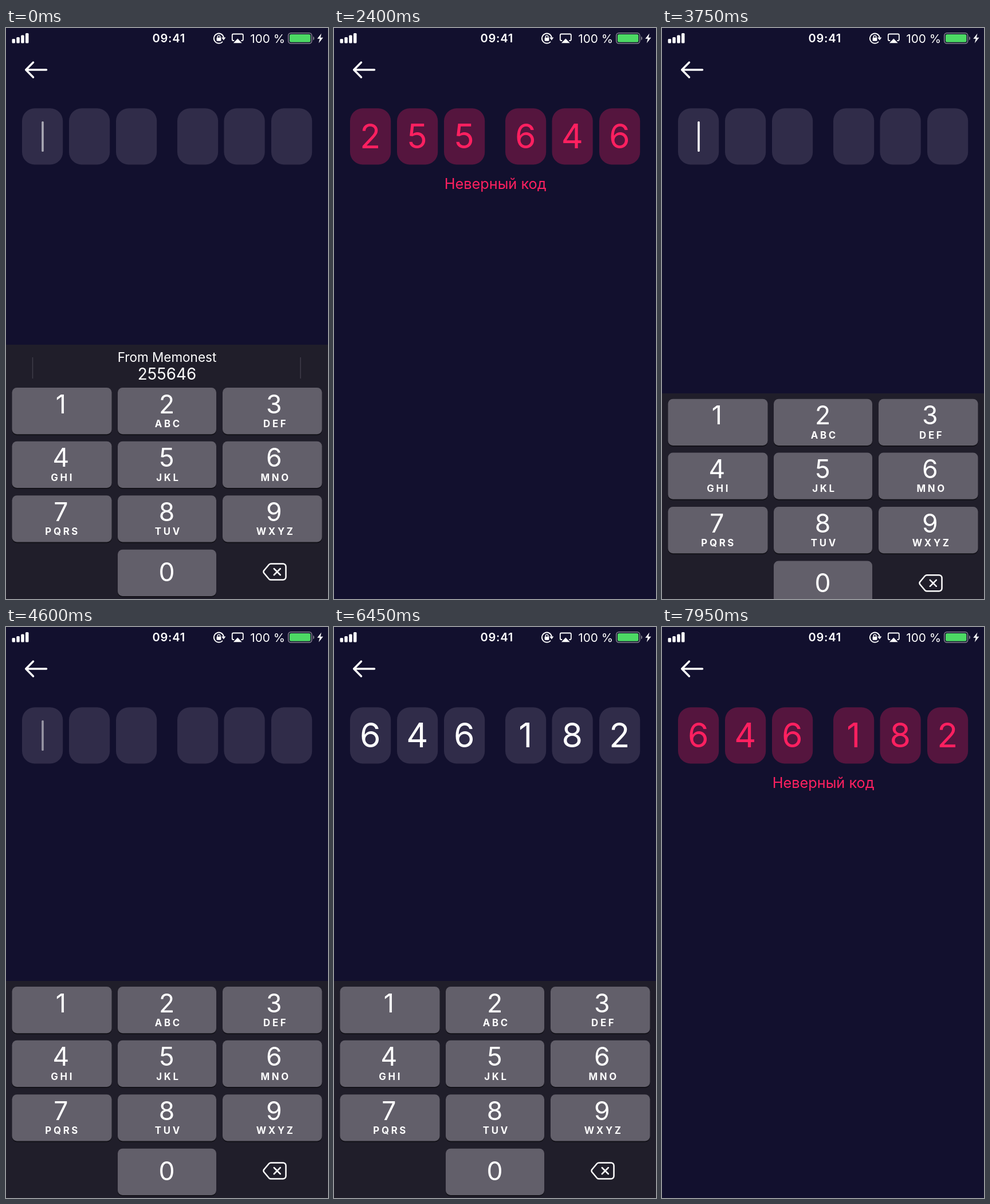
An HTML page that plays this animation: 562x997 px, repeating every 8 s.

```html
<!DOCTYPE html>
<html lang="ru">
<head>
<meta charset="utf-8">
<title>Code entry</title>
<style>
html, body { margin: 0; width: 100%; height: 100%; overflow: hidden; background: #12102e; }
svg { display: block; width: 562px; height: 997px; font-family: Inter, Roboto, sans-serif; }
text { text-anchor: middle; }
.line { fill: none; stroke: #fff; stroke-linecap: round; stroke-linejoin: round; }

#cells { fill: #302c49; animation: cells 8s infinite; }
.digits { fill: #fff; font-size: 59px; }
#first { animation: ink 8s infinite, first 8s linear infinite; }
#second { animation: ink 8s infinite; }
#second text { animation: 8s step-end infinite; }
#label { fill: #ff2060; font-size: 25.3px; animation: label 8s infinite, labelInk 8s infinite; }
#cursor { fill: #fff; animation: move 8s step-end infinite, blink 8s linear infinite; }
#spinner { animation: spinner 8s linear infinite; }
#spokes { stroke: #fff; stroke-width: 5.4; stroke-linecap: round; transform-origin: 279px 616px; animation: spin 1s steps(12) infinite; }
#keyboard { animation: keyboard 8s infinite; }
#bar { animation: bar 8s step-end infinite; }
#hint { fill: #fff; animation: hint 8s step-end infinite; }
#keys .num { fill: #fff; font-size: 44.5px; }
#keys .abc { fill: #fff; font-size: 16.8px; font-weight: 650; letter-spacing: 3.7px; }

@keyframes cells {
  0%, 24.375% { fill: #302c49; }
  26.875%, 44.5% { fill: #55153e; }
  47.2%, 89.375% { fill: #302c49; }
  91.875%, 100% { fill: #55153e; }
}
@keyframes ink {
  0%, 24.375% { fill: #fff; }
  26.875%, 46.5% { fill: #ff2060; }
  47.2%, 89.375% { fill: #fff; }
  91.875%, 100% { fill: #ff2060; }
}
@keyframes first {
  0%, 19.37% { opacity: 0; }
  19.375%, 44.5% { opacity: 1; }
  46.25%, 100% { opacity: 0; }
}
@keyframes d0 { 0% { opacity: 0; } 62.5%, 100% { opacity: 1; } }
@keyframes d1 { 0% { opacity: 0; } 65.625%, 100% { opacity: 1; } }
@keyframes d2 { 0% { opacity: 0; } 68.125%, 100% { opacity: 1; } }
@keyframes d3 { 0% { opacity: 0; } 72.5%, 100% { opacity: 1; } }
@keyframes d4 { 0% { opacity: 0; } 75%, 100% { opacity: 1; } }
@keyframes d5 { 0% { opacity: 0; } 80%, 100% { opacity: 1; } }
@keyframes label {
  0%, 24.375% { transform: translateY(-48px); }
  26.875%, 44.5% { transform: none; }
  47.2%, 89.375% { transform: translateY(-48px); }
  91.875%, 100% { transform: none; }
}
@keyframes labelInk {
  0%, 44.5% { fill: #ff2060; opacity: 1; }
  47.2% { fill: #fff; opacity: .3; }
  50%, 100% { fill: #ff2060; opacity: 1; }
}
@keyframes move {
  0% { transform: none; }
  62.5% { transform: translateX(82px); }
  65.625% { transform: translateX(164px); }
  68.125% { transform: translateX(270.5px); }
  72.5% { transform: translateX(352px); }
  75%, 100% { transform: translateX(434.5px); }
}
@keyframes blink {
  0% { opacity: .6; }
  1.5%, 4.625% { opacity: 0; }
  7.125%, 11.5% { opacity: 1; }
  14%, 45% { opacity: 0; }
  45.6%, 50.6% { opacity: 1; }
  53.1%, 56.25% { opacity: 0; }
  58.75%, 79.99% { opacity: 1; }
  80%, 100% { opacity: 0; }
}
@keyframes spinner {
  0%, 18.75% { opacity: 0; }
  20.2%, 23.75% { opacity: 1; }
  25%, 84.25% { opacity: 0; }
  85.7%, 88.75% { opacity: 1; }
  90%, 100% { opacity: 0; }
}
@keyframes spin { to { transform: rotate(360deg); } }
@keyframes keyboard {
  0% { transform: none; }
  18.82% { transform: none; animation-timing-function: cubic-bezier(.38, .7, .125, 1); }
  21.82% { transform: translateY(446px); }
  45.18% { transform: translateY(446px); }
  45.1875% { transform: translateY(379px); animation-timing-function: cubic-bezier(.38, .7, .125, 1); }
  48.3125% { transform: none; }
  84.275% { transform: none; animation-timing-function: cubic-bezier(.38, .7, .125, 1); }
  87.325%, 100% { transform: translateY(381px); }
}
@keyframes bar { 0% { opacity: 1; } 25%, 100% { opacity: 0; } }
@keyframes hint { 0% { opacity: 1; } 17.5%, 100% { opacity: 0; } }
</style>
</head>
<body>
<svg id="stage" viewBox="0 0 562 997" xmlns="http://www.w3.org/2000/svg">
  <defs><clipPath id="below"><rect y="239" width="562" height="80"/></clipPath></defs>
  <rect width="562" height="997" fill="#12102e"/>

  <g fill="#fff">
    <rect x="10.5" y="19" width="5.5" height="7.5" rx="1.5"/>
    <rect x="18.3" y="16" width="5.5" height="10.5" rx="1.5"/>
    <rect x="26.2" y="12.5" width="5.5" height="14" rx="1.5"/>
    <rect x="34" y="9" width="5.5" height="17.5" rx="1.5"/>
    <text x="284.3" y="25.4" font-size="20" font-weight="600" letter-spacing=".8">09:41</text>
    <text x="456.7" y="25.6" font-size="20.7">100 %</text>
    <path class="line" stroke-width="1.8" d="M377.5 24.3A8.6 8.6 0 1 1 379.8 16"/>
    <path d="M376 16.5h7.4l-3.6 5z"/>
    <rect x="367.6" y="16.8" width="7.8" height="6" rx="1"/>
    <path class="line" stroke-width="1.4" d="M369.2 17v-1.6a2.3 2.3 0 0 1 4.6 0V17"/>
    <path class="line" stroke-width="1.8" d="M397.5 22h-.7a2 2 0 0 1-2-2v-7.5a2 2 0 0 1 2-2h15a2 2 0 0 1 2 2V20a2 2 0 0 1-2 2h-.7"/>
    <path d="M404.3 18.5l7.4 7.7h-14.8z"/>
    <rect x="492.7" y="8.7" width="41" height="18.3" rx="4.5" fill="none" stroke="#85838f" stroke-width="1.5"/>
    <rect x="495" y="11" width="36.4" height="13.7" rx="2.5" fill="#4cd964"/>
    <path d="M536 14.5a4 4 0 0 1 0 7z" fill="#85838f"/>
    <path d="M550.5 9.5l-7.3 9.3h4.5l-2 7.7 7.8-9.7h-4.7z"/>
  </g>
  <path class="line" stroke-width="3.5" d="M70.5 73H35M47.5 60L34.7 73l12.8 13"/>

  <g clip-path="url(#below)"><text id="label" x="281.5" y="280.5">Неверный код</text></g>
  <g id="cells"></g>
  <g id="first" class="digits"></g>
  <g id="second" class="digits"></g>
  <rect id="cursor" x="62.2" y="163" width="3.6" height="53" rx="1.5"/>

  <g id="spinner"><g id="spokes"></g></g>

  <g id="keyboard">
    <g id="bar">
      <rect y="553" width="562" height="66" fill="#201e2a"/>
      <path d="M46.5 575v37M514 575v37" stroke="#3f3d49" stroke-width="1.5"/>
      <g id="hint">
        <text x="281" y="583" font-size="22.5">From Memonest</text>
        <text x="281" y="614" font-size="27.8">255646</text>
      </g>
    </g>
    <rect y="618" width="562" height="390" fill="#201e2a"/>
    <g id="keys"></g>
    <path class="line" stroke-width="2.5" d="M462.5 935.5H483.5a5 5 0 0 1 5 5v18a5 5 0 0 1-5 5H462.5a5 5 0 0 1-3.6-1.5L450.5 952a3.5 3.5 0 0 1 0-5L458.9 937a5 5 0 0 1 3.6-1.5zM467.8 944l11 11M478.8 944l-11 11"/>
  </g>
</svg>
<script>
const $ = id => document.getElementById(id);

function add(parent, tag, attrs, text) {
  const el = document.createElementNS("http://www.w3.org/2000/svg", tag);
  for (const name in attrs) el.setAttribute(name, attrs[name]);
  if (text) el.textContent = text;
  return parent.appendChild(el);
}

// Code cells and both entered codes
[28, 110, 192, 299, 380.5, 463].forEach((x, i) => {
  add($("cells"), "rect", { x, y: 140.3, width: 71.2, height: 98.2, rx: 22 });
  const at = { x: x + 35.2, y: 210 };
  add($("first"), "text", at, "255646"[i]);
  add($("second"), "text", at, "646182"[i]).style.animationName = "d" + i;
});

// Spinner: the head leads, the tail fades counter-clockwise
for (let i = 0; i < 12; i++) {
  add($("spokes"), "path", {
    d: "M279 600.3V588",
    opacity: Math.max(0.25, 0.9 - i * 0.11),
    transform: `rotate(${(1 - i) * 30} 279 616)`
  });
}

// Number pad: left edge, width and text centre of each column
const cols = [[10.5, 174, 96.3], [195, 172, 281], [378, 173.5, 468.3]];
const rows = [628, 721.7, 816.2, 910.7];
const letters = ["", "ABC", "DEF", "GHI", "JKL", "MNO", "PQRS", "TUV", "WXYZ"];

function addKey(num, abc, col, row) {
  const [x, width, mid] = cols[col], y = rows[row];
  const box = { x, width, height: 81.3, rx: 8.5 };
  add($("keys"), "rect", { ...box, y: y + 2, fill: "#131219" });
  add($("keys"), "rect", { ...box, y, fill: "#625f6a" });
  add($("keys"), "text", { class: "num", x: mid - 0.5, y: y + (row < 3 ? 44.7 : 55) }, num);
  if (abc) add($("keys"), "text", { class: "abc", x: mid + 2.4, y: y + 69 }, abc);
}
letters.forEach((abc, i) => addKey(String(i + 1), abc, i % 3, Math.floor(i / 3)));
addKey("0", "", 1, 3);
</script>
</body>
</html>
```
